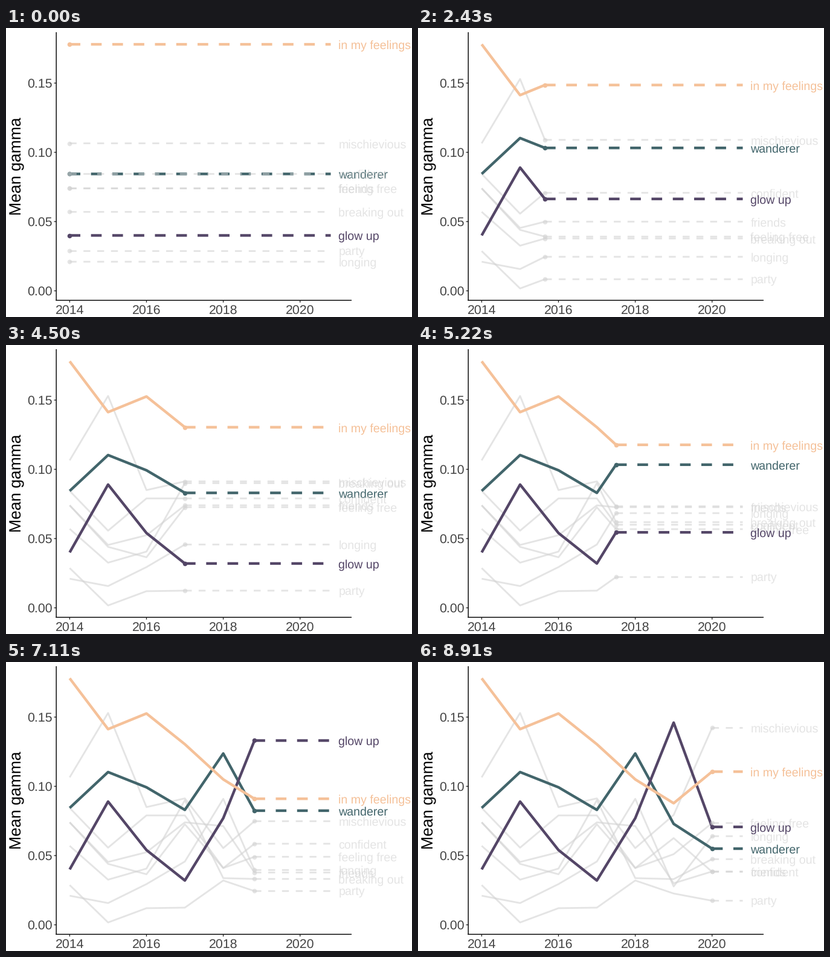
A matplotlib script that plays this animation: 672 px wide and 480 px high, repeating every 9 s.

```python
import matplotlib.pyplot as plt
import numpy as np
from matplotlib.animation import FuncAnimation

plt.rcParams["font.family"] = ["Liberation Sans"]
plt.rcParams["text.hinting"] = "no_hinting"

W, H, DPI = 672, 480, 96
FRAMES, INTERVAL = 100, 90
PT = 72 / DPI
YEARS = np.arange(2014, 2021)
KEY_FRAMES = np.round((YEARS - 2014) / 6 * (FRAMES - 1))
GREY, TEAL, PURPLE, ORANGE = "#d3d3d3", "#42656b", "#544667", "#f5c199"

# One key point per year, in thousandths of gamma; later rows lie on top.
TOPICS = [
    ("wanderer", TEAL, (84.4, 110.3, 99.3, 83, 123.7, 72.9, 55)),
    ("breaking out", GREY, (57, 32.6, 40.6, 90, 33.7, 33, 47.4)),
    ("confident", GREY, (84.4, 55.7, 79, 79, 41, 62.6, 38.3)),
    ("feeling free", GREY, (74, 44, 36.5, 72.6, 41, 51, 73.5)),
    ("friends", GREY, (74, 45.4, 52.4, 74, 71.3, 30, 38.5)),
    ("longing", GREY, (21, 15.7, 29.4, 45.7, 91, 27.7, 64)),
    ("mischievious", GREY, (106.5, 153, 85, 91.3, 55.4, 79.3, 142.2)),
    ("party", GREY, (28.7, 1.7, 12, 12.4, 32, 22.6, 17.4)),
    ("glow up", PURPLE, (40, 89, 54, 32, 77, 146, 70.7)),
    ("in my feelings", ORANGE, (178, 141.3, 152.6, 130.4, 105, 87.8, 110.6)),
]


def px(year):
    return 105.4 + 63.55 * (np.asarray(year) - 2014)


def py(thousandths):
    return 436.5 - 2.3 * np.asarray(thousandths)


fig = plt.figure(figsize=(W / DPI, H / DPI), dpi=DPI, facecolor="white")
ax = fig.add_axes([0, 0, 1, 1])
ax.set_xlim(0, W)
ax.set_ylim(H, 0)
ax.axis("off")


def stroke(xs, ys, color, width, **kw):
    return ax.plot(xs, ys, color=color, lw=width * PT, snap=False,
                   solid_capstyle="butt", dash_capstyle="butt",
                   solid_joinstyle="round", **kw)[0]


def label(x, y, text, size, color, **kw):
    return ax.text(x, y, text, fontsize=size * PT, color=color,
                   va="baseline", **kw)


def draw_axes():
    left, bottom, tick = 83.2, 452.3, 3.7
    for value in range(0, 151, 50):
        y = py(value)
        stroke([left - tick, left], [y, y], "#333333", 1.42)
        label(76.5, y + 7.5, f"{value / 1000:.2f}", 21.33, "#444444", ha="right")
    for year in YEARS[::2]:
        x = px(year)
        stroke([x, x], [bottom, bottom + tick], "#333333", 1.42)
        label(x + 0.5, 475, str(year), 21.33, "#444444", ha="center")
    stroke([left, left], [7, bottom + 0.7], "black", 1.42)
    stroke([left - 0.7, 572], [bottom, bottom], "black", 1.42)
    label(25, 230, "Mean gamma", 26.67, "black", rotation=90,
          rotation_mode="anchor", ha="center")


class Topic:
    def __init__(self, row, name, color, values):
        self.values = values
        muted = color == GREY
        width, alpha = (2.85, 0.6) if muted else (4.41, 1)
        # Layers from back to front: paths, dashes, points, names.
        path_z, dash_z, dot_z, text_z = 100 * np.arange(4) + row
        self.path = stroke([], [], color, width, alpha=alpha,
                           zorder=path_z + (0 if muted else 50))
        self.dash = stroke([], [], color, width, alpha=alpha, zorder=dash_z,
                           linestyle=(0, (4, 4)))
        self.dot = ax.plot([], [], "o", color=color, alpha=alpha, mew=0,
                           ms=7.6 * PT, zorder=dot_z, snap=False)[0]
        self.text = label(px(2021), 0, name, 19.65, color, alpha=alpha,
                          zorder=text_z)

    def update(self, year):
        past = YEARS < year
        x, y = px(year), py(np.interp(year, YEARS, self.values))
        self.path.set_data(np.append(px(YEARS[past]), x),
                           np.append(py(self.values)[past], y))
        self.dash.set_data([x, px(2020.8)], [y, y])
        self.dot.set_data([x], [y])
        self.text.set_y(y + 7.8)


draw_axes()
topics = [Topic(row, *spec) for row, spec in enumerate(TOPICS)]


def update(frame):
    year = np.interp(frame, KEY_FRAMES, YEARS)
    for topic in topics:
        topic.update(year)
    return []


anim = FuncAnimation(fig, update, frames=FRAMES, interval=INTERVAL,
                     init_func=lambda: update(0), repeat=True, repeat_delay=0)
plt.show()
```
